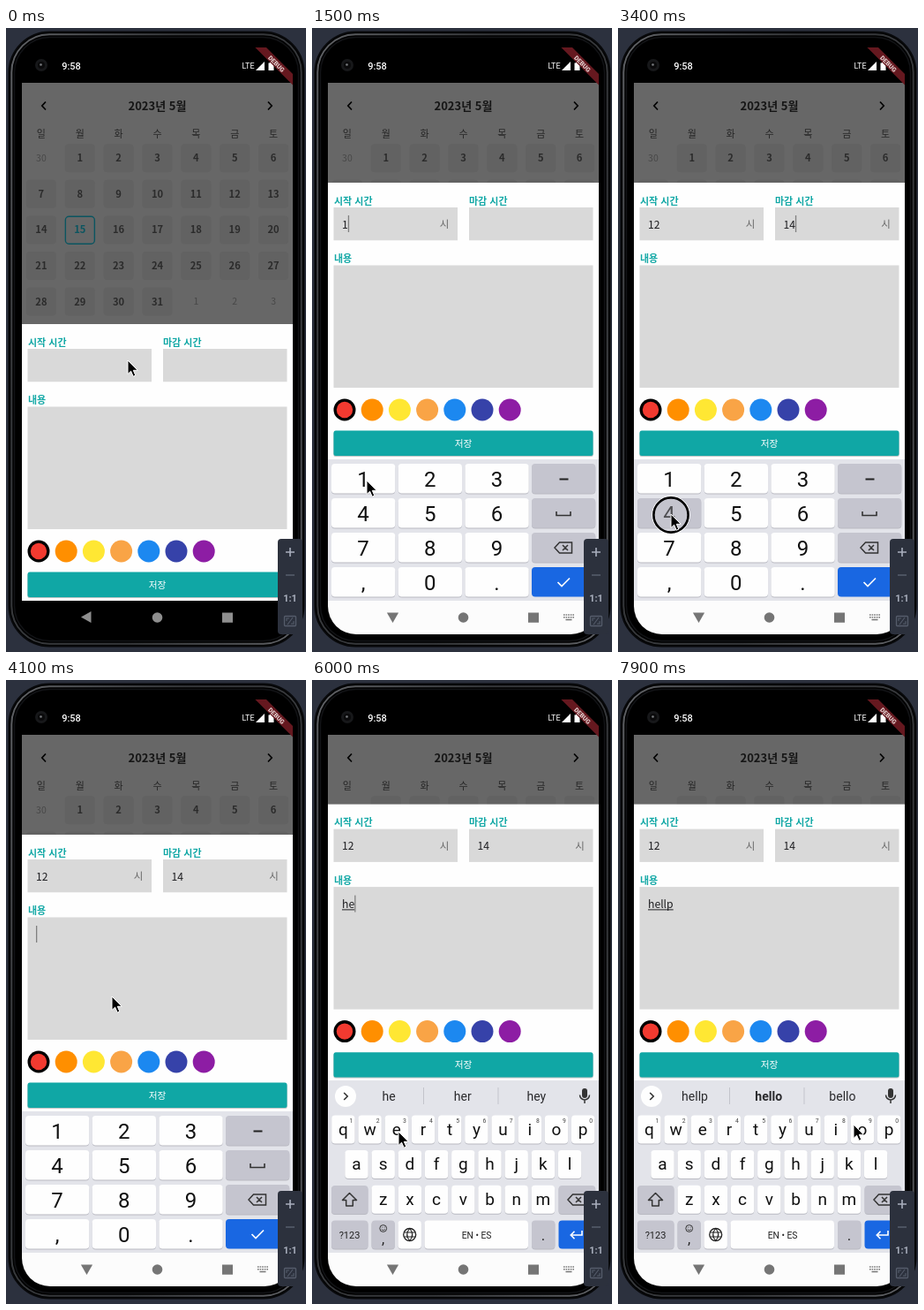
Recreate the animation shown at these times as an HTML page. Size 340x706 px, loop 8 s.

```html
<!DOCTYPE html>
<html lang="ko">
<head>
<meta charset="utf-8">
<title>Calendar form</title>
<style>
html, body { margin: 0; width: 100%; height: 100%; overflow: hidden; background: #2c313e; }
svg { display: block; width: 340px; height: 706px; }
text { font-family: Roboto, sans-serif; white-space: pre; }
.ko { font-family: 'Noto Sans CJK KR', 'Noto Sans CJK JP', 'Noto Sans CJK', sans-serif; }
</style>
</head>
<body>
<svg viewBox="0 0 340 706">
  <defs>
    <clipPath id="screen"><path d="M18 22H325V654a32 32 0 0 1-32 32H50a32 32 0 0 1-32-32Z"/></clipPath>
    <linearGradient id="rim" x2="1" y2="1">
      <stop offset="0" stop-color="#606266"/><stop offset=".3" stop-color="#36383b"/>
      <stop offset=".7" stop-color="#36383b"/><stop offset="1" stop-color="#606266"/>
    </linearGradient>
  </defs>
  <g id="phone"></g>
  <g clip-path="url(#screen)">
    <g id="calendar"></g>
    <g id="app"></g>
  </g>
  <g id="overlay"></g>
  <g id="pointer"></g>
</svg>
<script>
const DURATION = 8000, STEP = 100;
const TEAL = '#10a7a5', GREY_KEY = '#c5c5cf', BLUE = '#1967e2', INK = '#1d1d20';

// Timed states: [start, value]
const sheetTop = [[0, 335], [1000, 175], [4300, 140.6]];
const startHour = [[0, ''], [1400, '1'], [1800, '12']];
const endHour = [[0, ''], [3000, '1'], [3400, '14']];
const content = [[0, ''], [5200, 'h'], [6000, 'he'], [6800, 'hel'], [7100, 'hell'], [7300, 'hellp']];
const focus = [[0, ''], [500, 'start'], [2400, 'end'], [4100, 'content']];
const words = {
  h: ['h', 'hi', 'how'], he: ['he', 'her', 'hey'], hel: ['hel', 'hello', 'help'],
  hell: ['hell', 'hello', 'hells'], hellp: ['hellp', 'hello', 'bello']
};
// [start, end, key]
const presses = [
  [100, 300], [1300, 1500, '1'], [1700, 1900, '2'], [2300, 2500], [2900, 3100, '1'],
  [3300, 3500, '4'], [3800, 4000], [5100, 5300, 'h'], [5500, 5700, 'e'],
  [6700, 6900, 'l'], [7000, 7100, 'l'], [7200, 7300, 'p']
];
// [time, x, y]
const path = [
  [0, 138, 376], [500, 138, 376], [900, 234, 397], [1300, 62, 512], [1500, 62, 512],
  [1700, 135, 512], [1900, 135, 512], [2300, 240, 222], [2500, 240, 222], [2700, 84, 420],
  [2900, 60, 511], [3100, 60, 511], [3300, 60, 550], [3500, 60, 550], [3800, 120, 358],
  [4500, 120, 358], [4800, 147, 527], [4900, 147, 527], [5000, 175, 553], [5100, 200, 550],
  [5200, 200, 550], [5500, 98, 511], [6100, 98, 511], [6600, 297, 549.5], [7100, 297, 549.5],
  [7200, 295, 522], [7400, 295, 522], [7900, 267, 503], [8000, 267, 503]
];

const entry = (table, t) => table.filter(row => row[0] <= t).pop();
const at = (table, t) => entry(table, t)[1];
const $ = id => document.getElementById(id);
const range = (n, fn) => Array.from({ length: n }, (_, i) => fn(i)).join('');

const rect = (x, y, w, h, fill, r = 0, extra = '') =>
  `<rect x="${x}" y="${y}" width="${w}" height="${h}" rx="${r}" fill="${fill}" ${extra}/>`;
const circle = (x, y, r, fill, extra = '') => `<circle cx="${x}" cy="${y}" r="${r}" fill="${fill}" ${extra}/>`;
const line = (d, color, w = 1.5, extra = '') =>
  `<path d="${d}" fill="none" stroke="${color}" stroke-width="${w}" ${extra}/>`;
const shape = (d, fill, extra = '') => `<path d="${d}" fill="${fill}" ${extra}/>`;
const group = (x, y, body) => `<g transform="translate(${x} ${y})">${body}</g>`;
const label = (x, cy, str, size, fill, extra = '') =>
  `<text x="${x}" y="${cy + size * .36}" font-size="${size}" fill="${fill}" text-anchor="middle" ${extra}>${str}</text>`;
const ko = (x, cy, str, size, fill, extra = '') => label(x, cy, str, size, fill, 'class="ko" ' + extra);
const BOLD = 'font-weight="700"', LEFT = 'style="text-anchor:start"';

function drawPhone() {
  const ring = (inset, r, stroke, w) => rect(inset + 3.5, inset + 4.5, 334 - 2 * inset, 695 - 2 * inset, '#000', r,
    `stroke="${stroke}" stroke-width="${w}"`);
  return ring(0, 46, '#08090b', 2) + ring(2.8, 43, 'url(#rim)', 2) + ring(6, 40, '#121316', 1.5)
    + circle(40, 42, 7, '#17181a') + circle(40, 42, 4, '#0a0a0b') + circle(39.5, 41.5, 1.3, '#7a7c80')
    + label(74, 43, '9:58', 11, '#fff', 'font-weight="500"')
    + label(274.5, 43, 'LTE', 9, '#fff')
    + shape('M293 38V48H283Z', '#fff')
    + shape('M297.5 39.5H299V38H302V39.5H303.5V48H297.5Z', '#fff');
}

function drawCalendar() {
  const colX = c => 39.9 + 43.86 * c, rowY = r => 147.2 + 40.6 * r;
  const day = i => {
    const x = colX(i % 7), y = rowY(Math.floor(i / 7));
    if (i < 1 || i > 31) return ko(x, y, i < 1 ? 30 : i - 31, 10.5, '#484848');
    const today = i === 15;
    const box = today
      ? rect(x - 16.4, y - 15.2, 33, 31, '#676767', 4, 'stroke="#0b5560" stroke-width="1.4"')
      : rect(x - 17, y - 16, 34, 32, '#626262', 4);
    return box + ko(x, y, i, 11.2, today ? '#0b5560' : '#2b2b2b', BOLD);
  };
  return rect(18, 62, 307, 586, '#676767')
    + ko(171.5, 88, '2023년 5월', 13, '#161616', BOLD)
    + line('M45 83.5L40.8 88L45 92.5M297 83.5L301.2 88L297 92.5', '#000', 1.7)
    + range(7, i => ko(colX(i), 120.5, '일월화수목금토'[i], 11, '#262626'))
    + range(35, day);
}

function drawSheet(t) {
  const focused = at(focus, t), note = at(content, t);
  const tables = { start: startHour, end: endHour, content };
  const hour = (x, str, active) => rect(x, 28, 140.5, 37.3, '#d9d9d9')
    + ko(x + 9.5, 47.2, str, 12.2, INK, LEFT)
    + (active || str ? ko(x + 125.5, 47.2, '시', 11.5, '#666') : '');
  const colors = ['#f23a30', '#ff8f00', '#ffe733', '#f9a446', '#1c88f0', '#3642a9', '#8d1da4'];
  const widths = { h: 7.4, e: 6.8, l: 3.5, p: 7.5 };
  const width = str => [...str].reduce((sum, ch) => sum + (widths[ch] || 6.8), 0);

  let caret = '';
  if (focused) {
    const typed = entry(tables[focused], t);
    const since = Math.max(entry(focus, t)[0], typed[0]);
    const x = (focused === 'end' ? 187.3 : 34) + width(typed[1]);
    if (Math.floor((t - since) / 500) % 2 === 0)
      caret = rect(x, focused === 'content' ? 103 : 37, 1.3, 19, '#808080');
  }
  return rect(18, 0, 307, 313, '#fefefe')
    + ko(25, 20.8, '시작 시간', 11, TEAL, BOLD + LEFT) + ko(178, 20.8, '마감 시간', 11, TEAL, BOLD + LEFT)
    + hour(24.5, at(startHour, t), t >= 500) + hour(178, at(endHour, t), t >= 2400)
    + ko(25, 86.4, '내용', 11, TEAL, BOLD + LEFT)
    + rect(24.5, 93.5, 294, 138.5, '#d9d9d9')
    + ko(34, 113, note, 12.2, INK, LEFT)
    + (note ? rect(34, 118.8, width(note), 1, INK) : '')
    + caret
    + colors.map((c, i) => circle(37 + 31.2 * i, 257, 12.5, i ? c : '#000') + (i ? '' : circle(37, 257, 9.2, c))).join('')
    + rect(24.3, 282, 294.5, 28, '#bfc6c6', 2.5) + rect(24.5, 280.6, 294, 28.4, TEAL, 2.5)
    + ko(171.5, 295, '저장', 10.7, '#fff', 'font-weight="500"');
}

const key = (x, y, w, h, fill = '#fefefe') =>
  (fill === BLUE ? '' : rect(x, y + 1, w, h, '#b9bac2', 4)) + rect(x, y, w, h, fill, 4);
const backspace = (x, y) => group(x, y,
  line('M-4.5 -6H9.5V6H-4.5L-10 0ZM-1 -3L5 3M5 -3L-1 3', '#333', 1.5));

function drawNumberPad(pressed) {
  const rows = ['123', '456', '789', ',0.'];
  const digits = rows.map((row, r) => [...row].map((ch, c) => {
    const x = 22 + 75.7 * c, y = 493 + 39 * r;
    return key(x, y, 72.3, 33.5, ch === pressed ? GREY_KEY : '#fefefe') + label(x + 36, y + 17.5, ch, 24, '#111');
  }).join('')).join('');
  return rect(18, 488, 307, 160, '#e3e4ea') + digits
    + range(4, r => key(249, 493 + 39 * r, 72.3, 33.5, r < 3 ? GREY_KEY : BLUE))
    + line('M280.5 510.5H290.5', '#222', 1.8) + line('M277 547V551.5H293V547', '#333', 1.6)
    + backspace(285, 588) + line('M278.5 627L283 631.5L292 622.5', '#fff', 1.7);
}

const mic = rect(306, 462, 6, 11, '#333', 3) + line('M303.5 469.5a5.5 5.5 0 0 0 11 0M309 475V479', '#333', 1.5);

function drawToolbar(note) {
  const back = circle(38, 471, 12, '#fefefe')
    + line(note ? 'M36.2 467L40.2 471L36.2 475' : 'M40 467L36 471L40 475', '#333', 1.6) + mic;
  if (note) return back
    + words[note].map((w, i) => label(87 + 83.7 * i, 471.3, w, 14, '#2a2a2d', note === 'hellp' && i === 1 ? BOLD : '')).join('')
    + rect(126, 461, 1, 19, '#c3c4cb') + rect(210.5, 461, 1, 19, '#c3c4cb');
  return back
    + line('M80 473L85 478', '#444', 1.8) + circle(77, 469.5, 4.3, 'none', 'stroke="#444" stroke-width="1.7"')
    + line('M118 465H126.5Q128 465 128 466.5V472L123.5 477H118Q116.5 477 116.5 475.5V466.5Q116.5 465 118 465ZM123.5 477V472H128M119.5 472q2 2.5 4 0', '#444', 1.5)
    + circle(120, 469, .9, '#444') + circle(124.5, 469, .9, '#444')
    + label(166, 471, 'GIF', 10.5, '#444', 'font-weight="900"')
    + line('M205 465.5H215.5V477.5H205ZM207.5 470H213M207.5 472.5H213M207.5 475H211', '#444', 1.4) + rect(207.5, 463.5, 5.5, 3.5, '#444', 1)
    + rect(237, 461, 1, 19, '#c3c4cb')
    + range(3, i => circle(260 + 5 * i, 471, 1.6, '#444'));
}

function drawQwerty(t, pressed) {
  let popup = '';
  const letters = ['qwertyuiop', 'asdfghjkl', 'zxcvbnm'].map((row, r) => [...row].map((ch, i) => {
    const x = [35.4, 50.5, 80.7][r] + 30.2 * i, y = 492.5 + 39.6 * r;
    const down = ch === pressed;
    if (down) popup = rect(x - 15, y - 55, 30.5, 60, GREY_KEY, 5) + label(x, y - 34, ch, 23, '#111');
    return key(x - 13.2, y, 26.4, 32, down ? GREY_KEY : '#fefefe')
      + (down ? '' : label(x, y + 15.2, ch, 19, '#111'))
      + (r ? '' : label(x + 9, y + 6.5, (i + 1) % 10, 6.8, '#444'));
  }).join('')).join('');
  const bottom = 611.5;
  return rect(18, 453, 307, 195, '#e3e4ea') + drawToolbar(at(content, t)) + letters
    + key(22, 572, 41.5, 32, GREY_KEY) + line('M42.5 580.5L50.5 588.5H46.3V595H38.7V588.5H34.5Z', '#333', 1.5, 'stroke-linejoin="round"')
    + key(279.5, 572, 41.8, 32, GREY_KEY) + backspace(300, 588)
    + key(22, bottom, 41.5, 32, GREY_KEY) + label(42.5, 628, '?123', 11, '#222')
    + key(67.5, bottom, 26.4, 32, GREY_KEY) + label(80.7, 632, ',', 16, '#222')
    + circle(80.7, 620.5, 3.9, 'none', 'stroke="#333"') + line('M78.7 621.5q2 2.4 4 0M79 619.2h.8M81.6 619.2h.8', '#333', .9)
    + key(97.5, bottom, 26.4, 32)
    + circle(110.7, 627.5, 7, 'none', 'stroke="#222" stroke-width="1.3"')
    + line('M104 625H117.4M104 630H117.4M110.7 620.5q-6 7 0 14q6 -7 0 -14', '#222', 1.1)
    + key(127.5, bottom, 117.5, 32) + label(186.5, 628, 'EN • ES', 10.3, '#222')
    + key(249, bottom, 26.4, 32, GREY_KEY) + label(262, 628, '.', 17, '#222')
    + key(279.5, bottom, 41.8, 32, BLUE) + line('M306 623V628H293.5M297.5 623.8L293.3 628L297.5 632.2', '#fff', 1.6)
    + popup;
}

function drawNav(t) {
  const color = t < 700 ? '#8f8f8f' : '#757575';
  const turn = -90 * Math.min(1, Math.max(0, (t - 700) / 400));
  const keyboardIcon = line('M285 664H297M285 666.8H297', '#777', 1.6, 'stroke-dasharray="1.6 1"')
    + line('M287.5 669.5H294.5', '#777', 1.3);
  return `<g transform="translate(91.5 666.5) rotate(${turn})">${shape('M-6.5 0L5 -6.6V6.6Z', color)}</g>`
    + circle(171.5, 667, 5.8, color) + rect(245, 661.5, 12, 11.2, color) + (t >= 900 ? keyboardIcon : '');
}

function drawOverlay() {
  const dim = '#555c6b', bright = '#a9afbd';
  return shape('M282.4 22H295L325 52V64.6Z', '#65181f')
    + `<g transform="translate(306.5 40.5) rotate(45)">${label(0, 0, 'DEBUG', 7.2, '#e3cccc', 'font-weight="900"')}</g>`
    + rect(308, 578, 28, 108, '#2c313d', 4)
    + line('M317 593H327M322 588V598', bright, 1.6) + line('M317 619H327', dim, 1.6)
    + label(322, 645, '1:1', 11, bright, BOLD)
    + rect(315.5, 665.5, 13, 11, 'none', 1, `stroke="${dim}" stroke-width="1.3"`)
    + line('M318 671V668H321M326 671V674H323M319 675L325 667', dim, 1.1);
}

function pointerAt(t) {
  const i = Math.max(1, path.findIndex(p => p[0] > t));
  const [t0, x0, y0] = path[i - 1], [t1, x1, y1] = path[i];
  const k = (t - t0) / (t1 - t0);
  return [x0 + (x1 - x0) * k, y0 + (y1 - y0) * k];
}

function render(t) {
  const press = presses.find(p => t >= p[0] && t < p[1]);
  const pressed = press && press[2];
  let app = group(0, at(sheetTop, t), drawSheet(t));
  app += rect(18, 648, 307, 38, '#000');
  if (t >= 700) {
    const rise = 256 * Math.max(0, 1 - (t - 600) / 400) ** 2;
    app += group(0, rise, rect(18, 648, 307, 38, '#fcfcfc') + (t < 4200 ? drawNumberPad(pressed) : drawQwerty(t, pressed)));
  }
  $('app').innerHTML = app + drawNav(t);

  const [x, y] = pointerAt(t);
  const touch = circle(0, 1, 21.3, 'none', 'stroke="#fff" stroke-width="1"')
    + circle(0, 1, 19.6, '#c0c0c8', 'fill-opacity=".35" stroke="#000" stroke-width="2.6"');
  $('pointer').innerHTML = group(x, y, (press ? touch : '')
    + shape('M0 0V15.5L3.6 12.2L6.2 18.2L8.8 17.1L6.3 11.3H11.2Z', '#000', 'stroke="#fff" stroke-width="1" stroke-linejoin="round"'));
}

$('phone').innerHTML = drawPhone();
$('calendar').innerHTML = drawCalendar();
$('overlay').innerHTML = drawOverlay();

const began = performance.now();
let shown = -1;
function tick() {
  const t = Math.floor((performance.now() - began) % DURATION / STEP) * STEP;
  if (t !== shown) render(shown = t);
  requestAnimationFrame(tick);
}
tick();
</script>
</body>
</html>
```
